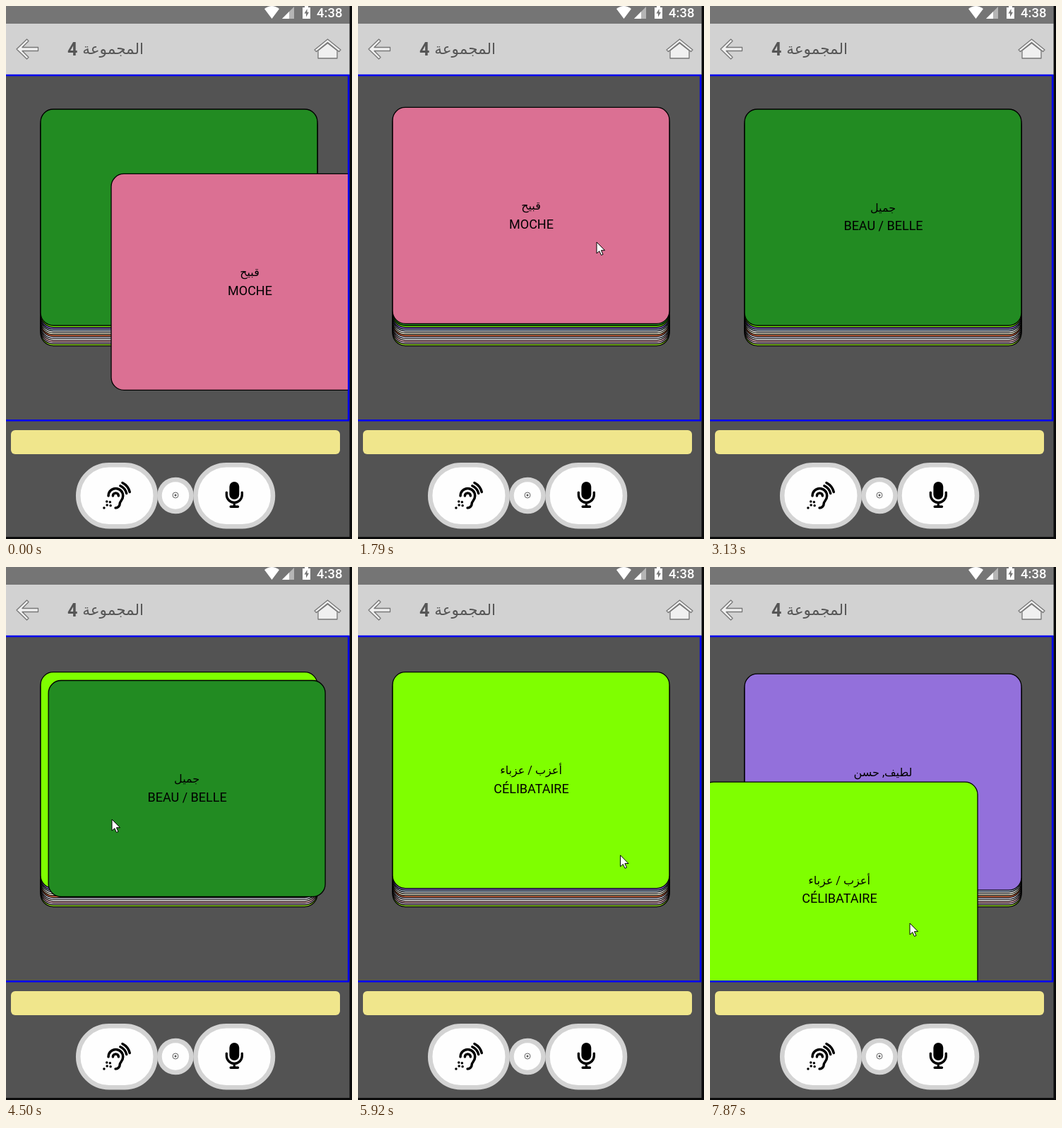
Write an HTML page that moves like this. It is 490 px wide and 754 px high and loops after 7990 ms.

```html
<!DOCTYPE html>
<html lang="ar">
<head>
<meta charset="utf-8">
<title>Flash cards</title>
<style>
  html, body { margin: 0; width: 100%; height: 100%; overflow: hidden; background: #0b0b0b; }
  svg { display: block; }
  text { font-family: Roboto, "DejaVu Sans", sans-serif; }
  .card rect { stroke: #000; stroke-width: 1.3; }
  .card text { text-anchor: middle; }
  .line { fill: none; stroke: #000; stroke-width: 46; stroke-linecap: round; }
  .icon { fill: #f0f0f0; stroke: #777; stroke-width: 1.3; stroke-linejoin: round; }
</style>
</head>
<body>
<svg width="490" height="754" viewBox="0 0 490 754">
  <rect width="490" height="754" fill="#0b0b0b"/>
  <rect width="486.500" height="751" fill="#535353"/>

  <!-- status bar -->
  <rect width="486.500" height="25" fill="#757575"/>
  <path d="M366 4Q376.500 -4 387 4L376.500 18Z" fill="#fff"/>
  <path d="M408 1V18H391Z" fill="#b5b5b5"/>
  <path d="M401 8V18H391Z" fill="#fff"/>
  <path d="M420 2H423V0H428V2H431V18H420Z" fill="#fff"/>
  <path d="M426.500 4L422.500 10.500H425V15.500L429 8.800H426.500Z" fill="#757575"/>
  <text x="440" y="16" font-size="18.500" font-weight="500" fill="#fff">4:38</text>

  <!-- title bar -->
  <rect y="25" width="486.500" height="72" fill="#d2d2d2"/>
  <path class="icon" d="M15 61L29.500 47L32 49.500L23 58.500H45.500V63.500H23L32 72.500L29.500 75Z"/>
  <text x="87" y="70" font-size="25" font-weight="700" fill="#555">4</text>
  <text x="195" y="67.500" font-size="21.500" text-anchor="end" fill="#555">المجموعة</text>
  <path class="icon" d="M442 63L455.500 52.500L469 63V74H442Z"/>
  <path class="icon" d="M437 62L455.500 47L474 62L471.500 64.500L455.500 51.500L439.500 64.500Z"/>

  <!-- card field -->
  <path d="M0 98H485.200V586.200H0" fill="none" stroke="#0000f0" stroke-width="2.600"/>
  <svg id="field" y="99" width="484" height="486" viewBox="0 99 484 486"></svg>

  <!-- bottom controls -->
  <rect x="7" y="600" width="466" height="34" rx="6" fill="#f0e68c"/>
  <g fill="#fefefe" stroke="#d3d3d3" stroke-width="6.500">
    <rect x="102.200" y="649.200" width="109.500" height="87" rx="43.500"/>
    <rect x="268.500" y="649.200" width="109.500" height="87" rx="43.500"/>
    <circle cx="240" cy="692.500" r="22.500"/>
  </g>
  <circle cx="240" cy="692" r="4" fill="none" stroke="#666"/>
  <circle cx="240" cy="692" r="1.500" fill="#555"/>

  <!-- ear -->
  <g class="line" transform="translate(137 673) scale(.0765)">
    <path d="M188 260a52 52 0 0 1 104 0M105 260a135 135 0 1 1 270 0C375 345 316 360 316 404A80 80 0 0 1 236 484"/>
    <path d="M325 75A205 205 0 0 1 440 215M365 20A260 260 0 0 1 500 190"/>
    <path d="M25 485h.1M80 430h.1M135 375h.1M75 365h.1M145 440h.1"/>
  </g>

  <!-- microphone -->
  <g class="line" transform="translate(310.600 673) scale(.0723)">
    <rect x="80" width="192" height="345" rx="96" fill="#000" stroke="none"/>
    <path d="M24 208v48a152 152 0 0 0 304 0v-48M176 408v80M104 488h144"/>
  </g>

  <path id="cursor" d="M0 0V16L3.800 12.700L6.500 18.500L9 17.400L6.400 11.700H11.500Z" fill="#fff" stroke="#000"/>
</svg>
<script>
const LOOP = 7990, BEAT = 134, TOP = 143.4, GAP = 2.6;
const $ = id => document.getElementById(id);

const colors = ['palevioletred', 'forestgreen', 'chartreuse', 'mediumpurple', 'lightsteelblue',
  'white', 'cornsilk', 'coral', 'lavender', 'white', 'pink', 'thistle', 'greenyellow'];
const words = [['قبيح', 'MOCHE'], ['جميل', 'BEAU / BELLE'], ['أعزب / عزباء', 'CÉLIBATAIRE'], ['لطيف, حسن', 'GENTIL']];

// Spans in which the picture moves; it rests between them
const spans = [[0, 390], [820, 1210], [1640, 1790], [2070, 3130], [3430, 4100], [4500, 6350], [6750, 7870]];

// Each drag carries a card from rest to (dx, dy); px and py bend its path
const drags = [
  { card: 0, from: 390, to: 0, dx: 100, dy: 94, px: 1, py: 1 },
  { card: 0, from: 2204, to: 3010, dx: -354, dy: 58, px: 2.5, py: 0.21 },
  { card: 1, from: 4410, to: 5440, dx: 234, dy: 154, px: 1.25, py: 0.97 },
  { card: 2, from: 6889, to: 7870, dx: -62, dy: 155.5, px: 0.8, py: 1.28 }
];

// Turning points of the pointer: time, x, y
const pointer = [[820, 293, 425], [1210, 340, 332], [1790, 338, 334], [2473, 255, 401], [2880, 28, 412],
  [3430, 95, 369], [3830, 186, 269], [4500, 150, 357], [5300, 302, 448], [6000, 385, 400],
  [6750, 303, 420], [7160, 341, 354], [7870, 283, 504]];

const cards = colors.map((color, i) => {
  const g = document.createElementNS('http://www.w3.org/2000/svg', 'g');
  const [arabic, french] = words[i] || ['', ''];
  g.setAttribute('class', 'card');
  g.innerHTML = `<rect width="392" height="306" rx="18" fill="${color}"/>
    <text x="196" y="144.500" font-size="16">${arabic}</text>
    <text x="196.500" y="171.300" font-size="18">${french}</text>`;
  $('field').prepend(g);
  return g;
});

const clamp = u => Math.min(1, Math.max(0, u));
const move = (el, x, y) => el.setAttribute('transform', `translate(${x} ${y})`);
const show = (el, on) => el.setAttribute('visibility', on ? 'visible' : 'hidden');

// Motion is held for one beat at a time
function snap(t) {
  const [a, b] = spans.findLast(s => s[0] <= t);
  const n = Math.round((b - a) / BEAT);
  return a + (b - a) / n * Math.floor(clamp((t - a) / (b - a)) * n + 0.01);
}

function offset(card, t) {
  let x = 0, y = 0;
  for (const d of drags.filter(d => d.card === card)) {
    const u = clamp((t - d.from) / (d.to - d.from));
    x += d.dx * u ** d.px;
    y += d.dy * u ** d.py;
  }
  return [x, y];
}

function pointerAt(t) {
  const i = Math.max(0, pointer.findLastIndex(p => p[0] <= t));
  const [t0, x0, y0] = pointer[i], [t1, x1, y1] = pointer[i + 1] || [LOOP, x0, y0];
  const u = clamp((t - t0) / (t1 - t0)), e = u * u * (3 - 2 * u);
  return [x0 + (x1 - x0) * e, y0 + (y1 - y0) * e];
}

function draw(now) {
  const t = snap(now % LOOP);
  const top = t < 3120 ? 0 : t < 5550 ? 1 : 2;
  cards.forEach((card, i) => {
    const [x, y] = offset(i, t);
    move(card, 49 + x, TOP + GAP * i + y);
    show(card, i >= top);
  });
  move($('cursor'), ...pointerAt(t));
  show($('cursor'), t >= 820 && (t < 2900 || t >= 3430));
  requestAnimationFrame(draw);
}
requestAnimationFrame(draw);
</script>
</body>
</html>
```
